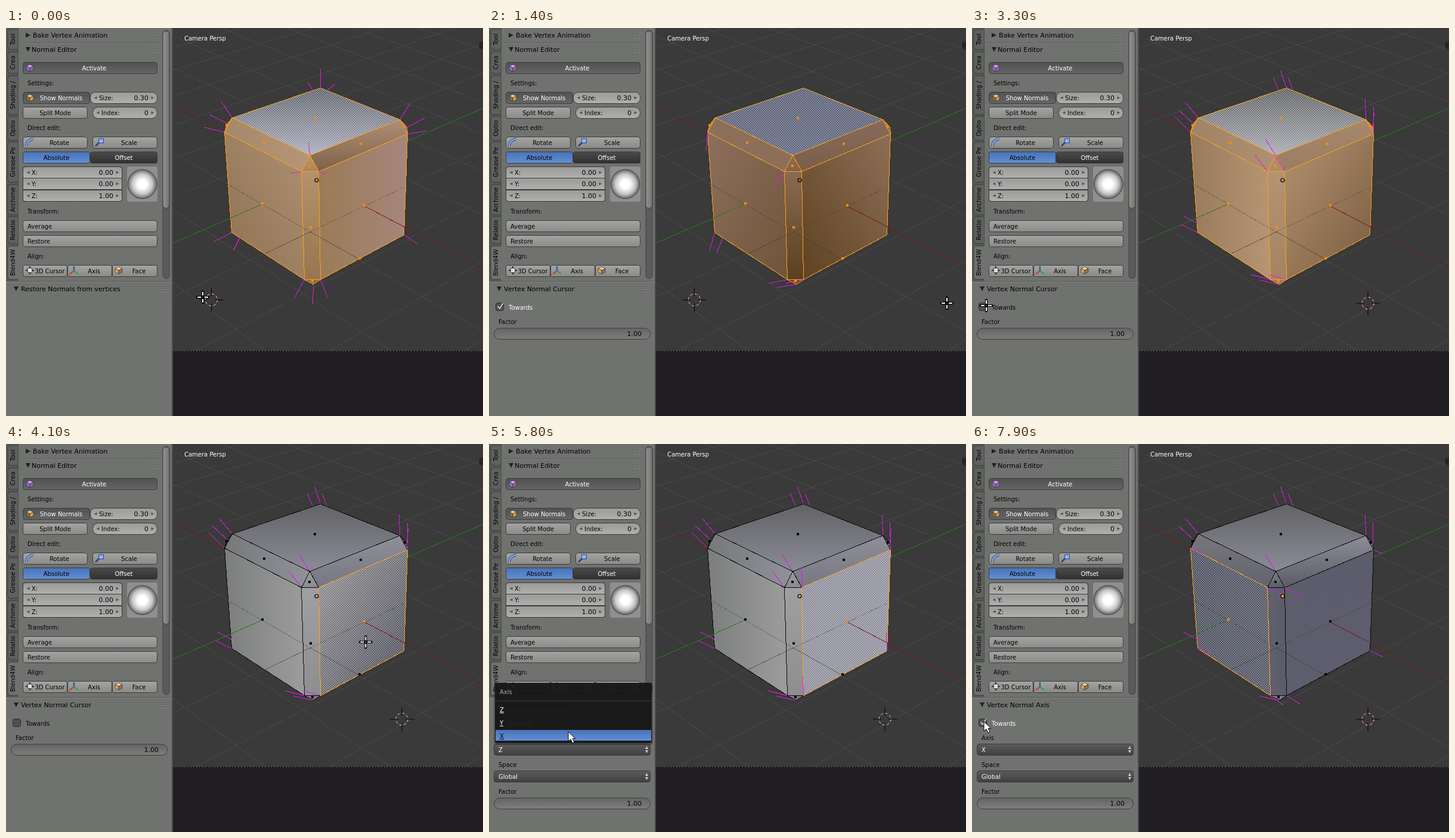
An HTML page that plays this animation: 800x650 px, repeating every 8 s.

```html
<!DOCTYPE html>
<html lang="en">
<head>
<meta charset="utf-8">
<title>Normal Editor</title>
<style>
html, body { margin: 0; width: 100%; height: 100%; overflow: hidden; background: #393a39; }
svg { display: block; width: 800px; height: 650px; font: 10px "DejaVu Sans", sans-serif; }
.head, .num { font-size: 11px; }
.crisp { shape-rendering: crispEdges; }
</style>
</head>
<body>
<svg id="stage" viewBox="0 0 800 650" xmlns="http://www.w3.org/2000/svg"></svg>
<script>
const LOOP = 8000, STEP = 100;

// Cube corners on screen; P, Q, g and h sit on hidden bevels.
const V = {
  A: [527, 100], P: [514, 104], Q: [538, 104], B: [660, 153], C: [509, 213], D: [379, 150],
  l: [371, 160], E: [366, 174], F: [495, 240], G: [378, 342], g: [378, 327], h: [392, 350],
  H: [500, 421], I: [524, 240], J: [673, 177], r: [672, 166], K: [667, 346], L: [527, 421], T: [515, 429]
};
const FACES = {
  top: 'ABCD', lb: 'DCFE', rb: 'CBJI', mid: 'FILH', tri: 'CFI', left: 'EFHG', right: 'IJKL',
  tip: 'HLT', lc: 'DlE', rc: 'BrJ'
};
const DOTS = {
  top: [518, 151], lb: [433, 192], rb: [595, 194], tri: [509, 231], left: [430, 294],
  right: [601, 297], mid: [511, 334], tip: [514, 424], lc: [370, 163], rc: [669, 165]
};
const DIRS = { h: [0, 0, 1, 0], v: [0, 0, 0, 1], d: [0, 0, 1, 1], u: [0, 1, 1, 0] };

// Each step overrides the one before; add merges into the current normals.
const STEPS = [
  { t: 0, title: 'Restore Normals from vertices', panel: '', sel: 'all', active: 'top', cur: [344.5, 455.5],
    face: { top: '666a73 b0b0bf v', lb: 'a5886a b69676 h', rb: 'ae8f76 7f6049 v', mid: 'b5926b 96754f v',
      tri: 'b8956f a9865f v', left: '8d7052 ae9171 u', right: '9b7b55 a5867c h', tip: '8b6a40 8b6a40 h',
      lc: 'a3805e a3805e h', rc: '987255 987255 h' },
    norm: { A: [0, -32], P: [-8, -13], Q: [14, -11], D: [-19, -28], l: [-29, -15], E: [-34, -8], C: [-2, -22],
      F: [-18, 3], I: [13, 4], B: [17, -27], r: [30, -16], J: [32, -5], G: [-29, 15], h: [-11, 22],
      K: [24, 16], H: [-16, 29], T: [-1, 34], L: [12, 30] } },
  { t: 500, title: 'Vertex Normal Cursor', panel: 'cursor', towards: 0,
    face: { top: '686a70 adafbc v', lb: 'b09274 b99877 h', rb: 'b3937a 94745a v', left: '9a7c5d b4946f h',
      right: 'b08d69 9a7a62 h' },
    norm: { A: [8, -29], P: [5, -22], Q: [9, -22], D: [0, -31], l: [0, -32], E: [2, -31], C: [10, -26],
      F: [14, -26], I: [16, -24], B: [16, -24], r: [20, -22], J: [23, -20], K: [27, -10], L: [27, -4], T: [31, -4] } },
  { t: 1100, towards: 1,
    face: { top: '61677c 686e84 v', lb: '8b705c 8c6f59 h', rb: '886a5c 7b5f48 v', mid: '8a6b50 5b3f20 v',
      tri: '8d6e56 80624a v', left: '8d705c 70543a d', right: '5f4222 8d6f57 u', tip: '62461f 62461f h',
      lc: '866850 866850 h', rc: '866850 866850 h' },
    norm: { E: [-2, 32], G: [-9, 32], h: [-11, 27], F: [-17, 25], H: [-30, 6], T: [-32, 5], L: [-28, 6] } },
  { t: 1700, cur: [664, 461] },
  { t: 2700, face: { left: '7d6149 8d6f55 h', right: '866648 75583c d' },
    norm: { F: [19, 26], I: [15, 25], C: [17, 27], K: [8, 30], L: [28, 8], T: [32, 7] } },
  { t: 3200, towards: 0,
    face: { top: '666769 acaeb6 v', lb: 'a08365 b09070 h', rb: 'a6886b 9a7d62 v', mid: 'b49373 a58462 v',
      tri: 'b08d68 b08d68 h', left: '997a5c b69573 h', right: 'b39270 795b3f d', tip: 'a07a4d a07a4d h',
      lc: 'a08060 a08060 h', rc: 'a08060 a08060 h' },
    norm: { A: [-10, -29], P: [-9, -21], Q: [-8, -21], D: [-22, -26], l: [-26, -24], E: [-26, -26], B: [-1, -35],
      J: [0, -46], r: [2, -24], C: [-18, -28], F: [-21, -28], I: [-16, -27], g: [-23, -12], G: [-27, -13],
      H: [-32, -8], L: [-29, -8], T: [-33, -7] } },
  { t: 4100, sel: 'right', active: 'right',
    face: { top: '626365 8b8b98 v', lb: '777879 91929a h', rb: '8f8f9a 777783 v', mid: 'a0a0a2 8e8e90 v',
      tri: '9b9ba0 8b8b8e v', left: '7c7e7e 9c9d9b h', right: '999999 4f4f5c d', tip: '7b7b7d 7b7b7d h',
      lc: '707172 707172 h', rc: '74747c 74747c h' }, add: { I: null } },
  { t: 5100, title: 'Vertex Normal Axis', panel: 'axis', axis: 'Z', towards: 1,
    face: { right: '9494a1 9696a3 h' }, add: { I: [0, -35], L: [-1, -31], K: [-1, -30], J: [-1, -46] } },
  { t: 6000, axis: 'X',
    face: { right: '5c5c6c 5e5e6e v', mid: '9b9b9d 61616f h', rb: '8d8d98 5c5c69 v' },
    add: { I: [27, 13], L: [24, 15], K: [21, 10], J: [15, 6], r: [0, -36] } },
  { t: 6500, sel: 'left', active: 'left', face: { left: '777979 919290 h' } },
  { t: 7400, face: { left: '555866 5b5e6d h', mid: '60616f 5b5b6a h', lb: '777779 636371 v', tri: '808088 5d5d6b v' },
    add: { E: [21, 10], F: [25, 11], G: [20, 9], H: [22, 16], L: [24, 15] } }
];
let last = {};
const states = STEPS.map(s => last = {
  ...last, ...s, face: { ...last.face, ...s.face }, norm: { ...(s.norm || last.norm), ...s.add }
});

// Pointer path: time, x, y.
const PATH = [
  [0, 330, 451], [100, 320, 449], [400, 70, 405], [600, 70, 405], [1000, 20, 466], [1100, 20, 466],
  [1400, 768, 461], [1500, 784, 462], [1700, 664, 461], [1900, 668, 460], [2500, 70, 405], [2700, 70, 405],
  [3100, 24, 465], [3500, 24, 465], [4000, 610, 330], [4300, 590, 335], [5000, 140, 401], [5200, 140, 401],
  [5500, 133, 510], [5600, 133, 505], [5800, 133, 482], [6000, 133, 482], [6100, 150, 480], [6400, 440, 300],
  [6500, 440, 300], [7000, 160, 480], [7100, 122, 409], [7400, 122, 409], [7600, 60, 525], [7900, 20, 465], [8000, 20, 465]
];

const within = (t, a, b) => t >= a && t < b;
const line = (x1, y1, x2, y2, c, more = '') => `<path d="M${x1} ${y1}L${x2} ${y2}" stroke="${c}" fill="none" ${more}/>`;
const poly = (pts, fill, more = '') => `<polygon points="${pts}" fill="${fill}" ${more}/>`;
const box = (x, y, w, h, fill, more = '') => `<rect x="${x}" y="${y}" width="${w}" height="${h}" fill="${fill}" ${more}/>`;
const text = (x, y, s, fill = '#000', more = '') => `<text x="${x}" y="${y}" fill="${fill}" ${more}>${s}</text>`;
const mid = 'text-anchor="middle"', number = 'text-anchor="end" class="num"';
const corners = name => [...FACES[name]].map(k => V[k]).join(' ');

function grad(id, from, to, dir = 'v') {
  const [a, b, c, d] = DIRS[dir];
  return `<linearGradient id="${id}" x1="${a}" y1="${b}" x2="${c}" y2="${d}">` +
    `<stop stop-color="#${from}"/><stop offset="1" stop-color="#${to}"/></linearGradient>`;
}

const DEFS = grad('btn', 'a4a5a3', '8a8b89') + grad('dark', '515251', '646564') + grad('num', '9a9b99', 'b0b1af') +
  grad('menu', '5a5b5a', '3f403f') + grad('blue', '4773b9', '638fd6') + grad('off', '4a4b4a', '2f302f') +
  grad('slide', '646564', '7d7e7c') + grad('bar', '939492', '737472', 'h') +
  '<radialGradient id="ball"><stop offset=".3" stop-color="#fff"/><stop offset=".7" stop-color="#c4c4c4"/>' +
  '<stop offset="1" stop-color="#626262"/></radialGradient>' +
  '<pattern id="stipple" width="4" height="4" patternUnits="userSpaceOnUse">' +
  '<path d="M0 0h1v1h-1zM2 2h1v1h-1z" fill="#fff" opacity=".65"/></pattern>';

function button(x, y, w, h, style, r = 4) {
  return box(x + .5, y + .5, w - 1, h - 1, `url(#${style})`, `rx="${r}" stroke="#3b3c3b"`);
}
function labelled(x, y, w, style, label, fill = '#000', shift = 0, r = 4) {
  return button(x, y, w, 20, style, r) + text(x + w / 2 + shift, y + 14, label, fill, mid);
}
function tri(x, y, dir, s = 3, fill = '#555') {
  const p = dir === 'down' ? [[-s, -s], [s, -s], [0, s]] : dir === 'up' ? [[-s, s], [s, s], [0, -s]]
    : dir === 'left' ? [[s, -s], [s, s], [-s, 0]] : [[-s, -s], [-s, s], [s, 0]];
  return poly(p.map(([a, b]) => [x + a, y + b]).join(' '), fill);
}
function grip(x, y) {
  let s = '';
  for (let i = 0; i < 8; i++) {
    const gx = x + i % 4 * 3, gy = y + (i >> 2) * 4;
    s += box(gx, gy, 1, 1, '#3f403f') + box(gx + 1, gy + 1, 1, 1, '#aaa');
  }
  return s;
}
function fieldText(x, y, w, label, value) {
  const cy = y + 10;
  return tri(x + 9, cy, 'left', 2.5) + tri(x + w - 8, cy, 'right', 2.5) +
    text(x + 15, y + 14, label) + text(x + w - 15, y + 14, value, '#000', number);
}
function field(x, y, w, label, value, r) {
  return button(x, y, w, 20, 'num', r) + fieldText(x, y, w, label, value);
}
function vectorField(x, y, w) {
  let s = '<clipPath id="vec">' + box(x, y, w, 59, '#000', 'rx="4"') + '</clipPath><g clip-path="url(#vec)">';
  ['X:', 'Y:', 'Z:'].forEach((n, i) => {
    const top = y + Math.floor(i * 19.5);
    s += button(x, top, w, 20, 'num', 0) + fieldText(x, top, w, n, i === 2 ? '1.00' : '0.00');
  });
  return s + '</g>' + box(x + .5, y + .5, w - 1, 58, 'none', 'rx="4" stroke="#3b3c3b"');
}
function cubeIcon(x, y, a, b, c) {
  const p = (...n) => n.map(([i, j]) => [x + i, y + j]).join(' ');
  const k = 'stroke="#333" stroke-width=".7"';
  return poly(p([0, -6], [6, -3], [0, 0], [-6, -3]), a, k) + poly(p([-6, -3], [0, 0], [0, 6], [-6, 3]), b, k) +
    poly(p([6, -3], [0, 0], [0, 6], [6, 3]), c, k);
}

function viewport() {
  // Ground plane projected through the two vanishing points.
  const at = (X, Y) => {
    const a = -.047 * X, b = .0437 * Y, w = 1 + a + b;
    return [(520 - 1123 * a + 2489 * b) / w, (256 - 600 * a - 600 * b) / w].map(n => n.toFixed(1));
  };
  let s = box(279, 0, 521, 542, '#393a39') + '<g class="crisp">';
  for (let i = -8; i <= 8; i++) {
    s += line(...at(-8, i), ...at(8, i), i ? '#464746' : '#791a1c');
    s += line(...at(i, -8), ...at(i, 8), i ? '#464746' : '#267a20');
  }
  return s + '</g>' + box(279, 542, 521, 108, '#201e23') +
    line(279, 541.5, 800, 541.5, '#000') + line(279, 541.5, 800, 541.5, '#555', 'stroke-dasharray="2 3"') +
    text(299, 21, 'Camera Persp', '#fff') + '<circle cx="800" cy="29" r="7" fill="#242524"/>';
}

function sidebar() {
  let s = box(0, 0, 279, 650, '#707270') + box(0, 0, 20, 424, '#585a58') + box(278, 0, 2, 650, '#4b4c4b');
  const tabs = [['Tool', 2, 36], ['Crea', 40, 76], ['Shading /', 80, 145], ['Optio', 148, 188], ['Grease Pe', 191, 258],
    ['Archime', 262, 313], ['Relatio', 316, 361], ['Blend4W', 365, 421]];
  tabs.forEach(([name, a, b], i) => {
    const on = i === 7, cy = (a + b) / 2;
    s += `<path d="M20 ${a}H7Q3 ${a} 3 ${a + 4}V${b - 4}Q3 ${b} 7 ${b}H20" fill="${on ? '#707270' : '#5f615f'}" stroke="#3b3c3b"/>` +
      text(15, cy, name, '#000', `${mid} transform="rotate(-90 15 ${cy})"`);
  });
  s += line(20.5, 0, 20.5, 365, '#4a4b4a') + line(0, 424.5, 279, 424.5, '#555655') + line(0, 425.5, 279, 425.5, '#868886');
  s += line(25, 24.5, 258, 24.5, '#5a5b5a') + line(25, 25.5, 258, 25.5, '#7e807e');
  s += box(263, 4, 11, 416, '#5a5b5a', 'rx="5.5" stroke="#434443"') + box(263, 5, 11, 297, 'url(#bar)', 'rx="5.5" stroke="#3c3d3c"');
  s += tri(37, 12, 'right', 4, '#222') + tri(37, 36, 'down', 4, '#222') + grip(241, 11) + grip(241, 35);
  s += text(45, 16, 'Bake Vertex Animation', '#000', 'class="head"') + text(43, 40, 'Normal Editor', '#000', 'class="head"');
  [['Settings:', 96], ['Direct edit:', 171], ['Transform:', 311], ['Align:', 386]].forEach(([a, y]) => s += text(36, y, a));
  s += labelled(28, 57, 226, 'dark', 'Activate', '#fff', 7) + cubeIcon(40, 67, '#d6a4dc', '#7d74d8', '#a25bbc');
  s += labelled(28, 107, 113, 'dark', 'Show Normals', '#fff', 8) + cubeIcon(40, 117, '#e9c79a', '#8a6d4c', '#e39b45');
  s += field(141, 107, 113, 'Size:', '0.30', 8) + labelled(28, 132, 109, 'btn', 'Split Mode') + field(145, 132, 109, 'Index:', '0', 9);
  s += labelled(28, 182, 109, 'btn', 'Rotate', '#000', 7) + labelled(145, 182, 109, 'btn', 'Scale', '#000', 7);
  s += '<path d="M34 198Q35 187 46 186" fill="none" stroke="#234a8c" stroke-width="4"/><path d="M34 198Q35 187 46 186" fill="none" stroke="#8db4ec" stroke-width="2"/>';
  s += line(150, 198, 158, 190, '#234a8c', 'stroke-width="3"') + box(155.5, 185.5, 8, 7, '#8db4ec', 'stroke="#234a8c"');
  s += labelled(28, 207, 113, 'blue', 'Absolute', '#000', 0, 3) + labelled(141, 207, 113, 'off', 'Offset', '#fff', 0, 3);
  s += vectorField(28, 232, 167);
  s += box(203, 232, 51, 59, '#8f908e', 'rx="4"') + '<circle cx="228.5" cy="261.5" r="24.5" fill="url(#ball)" stroke="#444"/>';
  ['Average', 'Restore'].forEach((n, i) => s += button(28, 322 + i * 25, 226, 20, 'btn') + text(36, 336 + i * 25, n));
  return s;
}

function alignRow(pressed) {
  const one = (x, w, n, label, shift) =>
    labelled(x, 397, w, pressed === n ? 'dark' : 'btn', label, pressed === n ? '#fff' : '#000', shift, 3);
  return one(28, 75, 0, '3D Cursor', 8) + one(103, 75, 1, 'Axis', 7) + one(178, 76, 2, 'Face', 7) +
    '<circle cx="40" cy="406" r="4.5" fill="#ddd" stroke="#222"/><path d="M33 406h4m6 0h4M40 399v4m0 6v4" stroke="#222" stroke-width="1.5"/>' +
    line(114, 407, 114, 399, '#2858d8', 'stroke-width="2.5"') + line(114, 407, 107, 412, '#d53a2a', 'stroke-width="2.5"') +
    line(114, 407, 121, 412, '#36a53a', 'stroke-width="2.5"') + cubeIcon(189, 406, '#efd2a8', '#f3a23c', '#8f7550');
}

function slider(y) {
  return text(16, y - 6, 'Factor') + button(8, y + .5, 263, 19.5, 'slide', 9.5) + text(256, y + 14, '1.00', '#000', number);
}
function dropdown(y, label, value) {
  return text(16, y - 6, label) + button(8, y, 263, 20, 'menu') + text(16, y + 14, value, '#fff') +
    tri(264.5, y + 6.5, 'up', 2.5, '#ccc') + tri(264.5, y + 13.5, 'down', 2.5, '#ccc');
}
function operatorPanel(st) {
  let s = tri(17, 437, 'down', 4, '#222') + grip(258, 436) + text(25, 441, st.title, '#000', 'class="head"');
  if (!st.panel) return s;
  s += box(11.5, 460.5, 13, 13, '#4f504f', 'rx="3" stroke="#2b2c2b"') + text(33, 472, 'Towards', st.towards ? '#fff' : '#000');
  if (st.towards) s += '<path d="M14.5 466l3.5 4 5.5-9" fill="none" stroke="#ddd" stroke-width="1.6"/>';
  return s + (st.panel === 'cursor' ? slider(502)
    : dropdown(502, 'Axis', st.axis) + dropdown(547, 'Space', 'Global') + slider(592));
}
function popup(my) {
  const row = Math.max(0, Math.min(2, Math.floor((my - 435) / 22)));
  let s = box(8, 402, 267, 102, '#000', 'opacity=".25" rx="4"') + box(10, 400, 263, 101, '#161616', 'opacity=".93" rx="3"') +
    text(18, 419, 'Axis', '#aaa') + line(10, 430.5, 273, 430.5, '#3b3b3b') + box(11, 479 - (2 - row) * 22, 261, 18, 'url(#blue)');
  ['Z', 'Y', 'X'].forEach((n, i) => s += text(18, 449 + i * 22, n, i === row ? '#000' : '#fff', 'text-decoration="underline"'));
  return s;
}

function cube(st) {
  const all = st.sel === 'all', edge = all ? '#f9a01b' : '#0a0a0a';
  let s = '<defs>';
  for (const n in FACES) s += grad('f-' + n, ...st.face[n].split(' '));
  s += '</defs><g class="crisp" transform="translate(.5 .5)">';
  for (const n in FACES) s += poly(corners(n), `url(#f-${n})`, `stroke="${edge}"`);
  s += `<g transform="translate(-.5 -.5)">${poly(corners(st.active), 'url(#stipple)')}</g>`;
  if (!all) s += poly(corners(st.sel), 'none', 'stroke="#ffa31f"');
  // Grid lines that run along the cube's faces.
  const dots = 'stroke-dasharray="1 1" opacity=".7"';
  s += line(370, 261, 510, 341, '#3a3a39', dots) + line(510, 341, 668, 266, '#3a3a39', dots) +
    line(435, 377, 510, 341, '#3a3a39', 'opacity=".6"') + line(510, 341, 592, 387, '#3a3a39', 'opacity=".6"');
  s += line(367, 322, 430, 294, '#267a20') + line(601, 298, 670, 334, '#791a1c');
  for (const k in st.norm) {
    const d = st.norm[k], [x, y] = V[k];
    if (d) s += line(x, y, x + d[0], y + d[1], '#e815e8');
  }
  s += '</g>';
  for (const n in DOTS) {
    const [x, y] = DOTS[n];
    s += box(x - 2, y - 2, 4, 4, all || n === st.sel ? '#ff8c0a' : '#000');
  }
  s += box(591, 384, 4, 4, all ? '#ff8c0a' : '#000');
  return s + `<circle cx="521" cy="255" r="3" fill="${st.sel === 'left' ? '#f2a03c' : 'none'}" stroke="#000" stroke-width="1.2"/>`;
}

function target([x, y]) {
  return `<g transform="translate(${x} ${y})" fill="none"><circle r="10" stroke="#e8e8e8" stroke-dasharray="3.93"/>` +
    '<circle r="10" stroke="#b03030" stroke-dasharray="3.93" stroke-dashoffset="3.93"/>' +
    '<path d="M-20 0h14M6 0h14M0-20v14M0 6v14" stroke="#000"/></g>';
}
function pointerAt(t) {
  const i = PATH.findIndex(p => p[0] > t), a = PATH[i - 1], b = PATH[i], k = (t - a[0]) / (b[0] - a[0]);
  return [a[1] + (b[1] - a[1]) * k, a[2] + (b[2] - a[2]) * k];
}
function pointer(t, [x, y]) {
  const cross = x > 279 || within(t, 3200, 3500);
  const d = 'M-9 0h6M3 0h6M0-9v6M0 3v6';
  return `<g transform="translate(${x} ${y})">` + (cross
    ? `<path d="${d}" stroke="#000" stroke-width="4" stroke-linecap="square"/><path d="${d}" stroke="#fff" stroke-width="2"/>`
    : '<path d="M0 0V16L4 12.5L7 19L10 17.6L7.2 11.5H12Z" fill="#fff" stroke="#000"/>') + '</g>';
}
function pressedButton(t) {
  if (within(t, 400, 500) || within(t, 2500, 2700)) return 0;
  return within(t, 5000, 5100) || within(t, 7300, 7400) ? 1 : -1;
}

const stage = document.getElementById('stage');
stage.innerHTML = `<defs>${DEFS}</defs>${viewport()}<g id="scene"></g>${sidebar()}<g id="ui"></g>`;
const scene = document.getElementById('scene'), ui = document.getElementById('ui');

function draw(t) {
  const st = states.filter(s => s.t <= t).pop(), mouse = pointerAt(t);
  scene.innerHTML = cube(st) + target(st.cur);
  ui.innerHTML = alignRow(pressedButton(t)) + operatorPanel(st) +
    (within(t, 5600, 6000) ? popup(mouse[1]) : '') + pointer(t, mouse);
}

let shown = -1;
function tick() {
  const t = Math.floor(performance.now() % LOOP / STEP) * STEP;
  if (t !== shown) draw(shown = t);
  requestAnimationFrame(tick);
}
tick();
</script>
</body>
</html>
```
